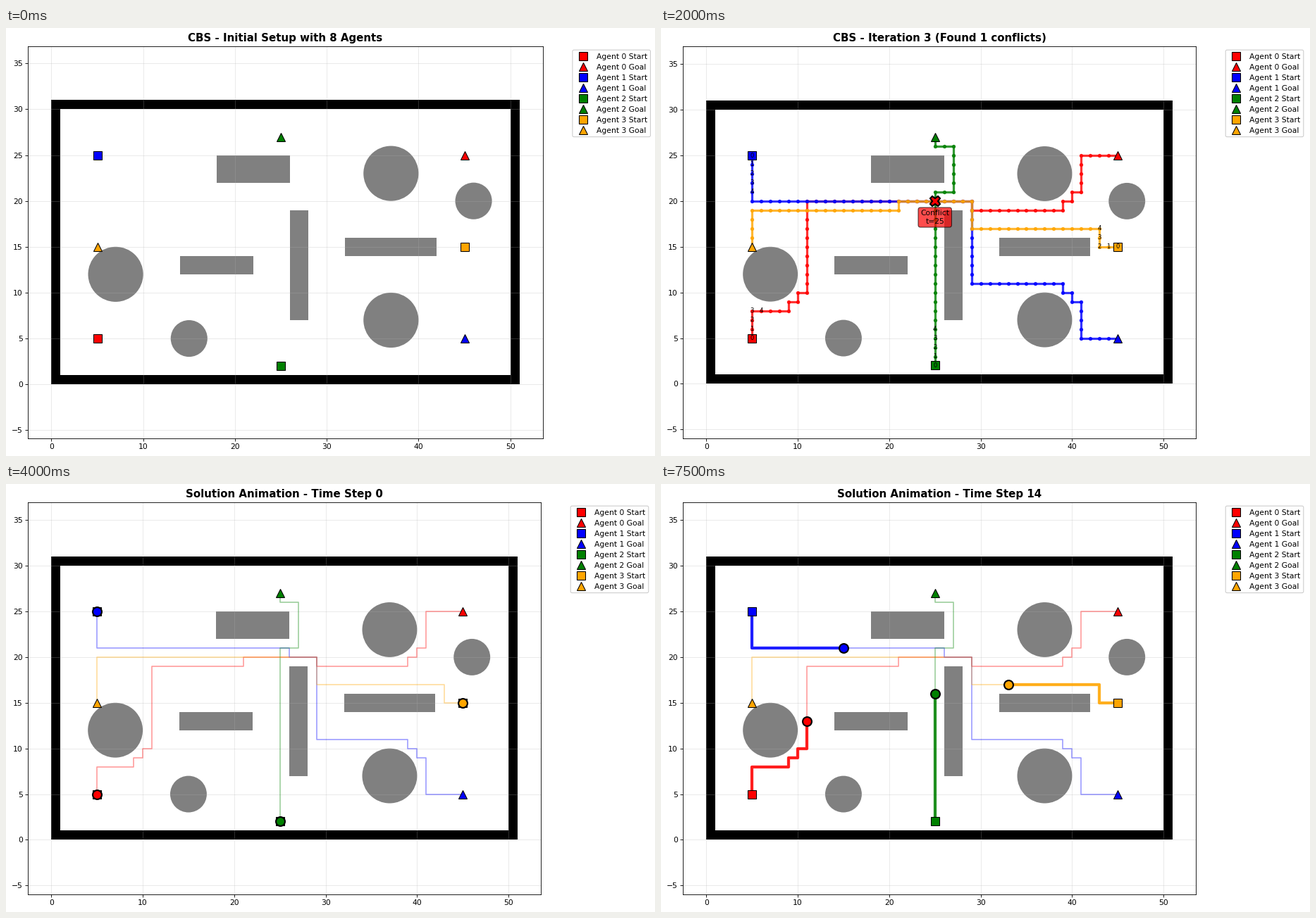
Recreate the animation shown at these times as a matplotlib script. Size 921 by 608 pixels, loop 8 s.

```python
from itertools import combinations

import matplotlib.pyplot as plt
from matplotlib.animation import FuncAnimation
from matplotlib.patches import Circle, FancyBboxPatch, Rectangle

W, H, DPI = 921, 608, 64
PT = 77 / DPI  # layout is measured in points at 77 dpi
EM = 10 * PT
LEFT, TOP, BOTTOM = 31.2, 25.6, 583
SPAN = 51 * 1.1  # map width plus margins

COLORS = ["red", "blue", "green", "orange"]
BLOCKS = [(18, 22, 8, 3), (14, 12, 8, 2), (26, 7, 2, 12), (32, 14, 10, 2)]
DISCS = [(7, 12, 3), (15, 5, 2), (37, 23, 3), (37, 7, 3), (46, 20, 2)]


def free(x, y, gap=0.5):
    return (all((x - cx) ** 2 + (y - cy) ** 2 > (r + gap) ** 2 for cx, cy, r in DISCS)
            and not any(bx - gap < x < bx + w + gap and by - gap < y < by + h + gap
                        for bx, by, w, h in BLOCKS))


def toward(a, b):
    return a + (b > a) - (b < a)


def route(*stops):
    """Step vertically when possible, else sideways; a repeated stop is a wait."""
    path = [stops[0]]
    for stop, (gx, gy) in zip(stops, stops[1:]):
        if stop == (gx, gy):
            path.append(stop)
        while path[-1] != (gx, gy):
            x, y = path[-1]
            up = toward(y, gy)
            path.append((x, up) if up != y and free(x, up) else (toward(x, gx), y))
    return path


def plan(detours=""):
    """Routes of all agents; letters name who detours (r, b, o) or waits (w)."""
    red = [(11, 19), (21, 19), (21, 20)] if "r" in detours else [(11, 20)]
    blue = [(5, 21), (26, 21), (26, 20)] if "b" in detours else [(5, 20)]
    orange = [(21, 20), (21, 19), (5, 19)] if "o" in detours else [(5, 20)]
    pause = [(43, 15)] if "w" in detours else []
    gate = (29, 20)
    return [
        route((5, 5), (5, 8), (7, 8), *red, gate, (29, 19), (37, 19), (45, 25)),
        route((5, 25), *blue, gate, (29, 11), (37, 11), (45, 5)),
        route((25, 2), (25, 21), (27, 26), (25, 26), (25, 27)),
        route((45, 15), (43, 15), *pause, (43, 17), (29, 17), gate, *orange, (5, 15)),
    ]


def find_conflicts(paths):
    found = []
    for a, b in combinations(paths, 2):
        for t in range(min(len(a), len(b)) - 1):
            if a[t] == b[t] or (a[t], a[t + 1]) == (b[t + 1], b[t]):
                found.append((*a[t], t))
    return found


ITERATIONS = [plan(d) for d in ("", "r", "o", "r", "ow")]
FINAL = plan("rb")

fig = plt.figure(figsize=(W / DPI, H / DPI), dpi=DPI, facecolor="white")
ax = fig.add_axes([0, 0, 1, 1])
side = fig.add_axes([0, 0, 1, 1])


def mark(axes, x, y, shape, color, size=11.5, edge=1, z=5):
    axes.plot([x], [y], shape, color=color, ms=size * PT, mec="black",
              mew=edge * PT, zorder=z, clip_on=False)


def draw_legend(right):
    x = right + 42
    side.clear()
    side.set(xlim=(0, W), ylim=(H, 0))
    side.axis("off")
    side.add_patch(FancyBboxPatch(
        (x, 31.2), 110.6, 123.4, boxstyle="round,pad=0,rounding_size=2.1",
        fc="white", ec="#cccccc", lw=PT))
    for k in range(8):
        agent, goal = divmod(k, 2)
        y = 40 + 15 * k
        mark(side, x + 15.2, y, "^" if goal else "s", COLORS[agent])
        side.text(x + 34.2, y + 4, f"Agent {agent} {'Goal' if goal else 'Start'}",
                  fontsize=EM, va="baseline")


def draw_map(title, right):
    draw_legend(right)
    width, height = right - LEFT, BOTTOM - TOP
    half = height / 2 * SPAN / width
    ax.clear()
    ax.set_position([LEFT / W, 1 - BOTTOM / H, width / W, height / H])
    ax.set(xlim=(25.5 - SPAN / 2, 25.5 + SPAN / 2), ylim=(15.5 - half, 15.5 + half))
    ax.set_xticks(range(0, 51, 10))
    ax.set_yticks(range(-5, 36, 5))
    ax.tick_params(labelsize=EM, length=3.5 * PT, width=0.8 * PT, pad=3.5 * PT)
    for spine in ax.spines.values():
        spine.set_linewidth(0.8 * PT)
    ax.grid(True, color="#b0b0b0", alpha=0.3, lw=0.8 * PT)
    ax.set_title(title, fontsize=14 * PT, fontweight="bold", pad=6 * PT)
    ax.add_patch(Rectangle((0, 0), 51, 31, fc="black", lw=0))
    ax.add_patch(Rectangle((1, 1), 49, 29, fc="white", lw=0))
    for x, y, w, h in BLOCKS:
        ax.add_patch(Rectangle((x, y), w, h, fc="gray", lw=0))
    for x, y, r in DISCS:
        ax.add_patch(Circle((x, y), r, fc="gray", lw=0))
    for path, color in zip(FINAL, COLORS):
        mark(ax, *path[0], "s", color)
        mark(ax, *path[-1], "^", color)


def draw_plan(paths):
    for path, color in zip(paths, COLORS):
        ax.plot(*zip(*path), "o-", color=color, lw=3 * PT, ms=4 * PT,
                mew=PT, alpha=0.8, zorder=2)
        for t, (x, y) in enumerate(path[:5]):
            ax.text(x, y, str(t), fontsize=8 * PT, ha="center", va="center", zorder=6)


def draw_conflict(x, y, t):
    mark(ax, x, y, "X", "red", size=13.5, edge=2, z=10)
    ax.text(x, y - 1.78, f"Conflict\nt={t}", fontsize=EM, ha="center", va="center",
            zorder=9, bbox=dict(boxstyle="round,pad=0.3", fc="red", ec="black",
                                alpha=0.7, lw=PT))


def draw_step(t):
    for path, color in zip(FINAL, COLORS):
        ax.plot(*zip(*path), color=color, lw=1.5 * PT, alpha=0.4, zorder=2)
        ax.plot(*zip(*path[:t + 1]), color=color, lw=4 * PT, alpha=0.85, zorder=3)
        mark(ax, *path[t], "o", color, size=12, edge=2, z=10)


def draw(i):
    right = 759.2
    if i == 0:
        draw_map("CBS - Initial Setup with 8 Agents", 761.9)
    elif i == 1:
        draw_map("CBS - Initial Solution (No Constraints)", right)
        draw_plan(plan())
    elif i < 7:
        paths = ITERATIONS[i - 2]
        conflicts = find_conflicts(paths)
        draw_map(f"CBS - Iteration {i - 1} (Found {len(conflicts)} conflicts)", right)
        draw_plan(paths)
        for conflict in conflicts:
            draw_conflict(*conflict)
    elif i == 7:
        draw_map("CBS - Final Solution Found!", right)
        draw_plan(FINAL)
    else:
        step = 2 * (i - 8)
        draw_map(f"Solution Animation - Time Step {step}", right)
        draw_step(step)


anim = FuncAnimation(fig, draw, frames=16, init_func=lambda: draw(0),
                     interval=500, repeat=True, repeat_delay=0, blit=False)
plt.show()
```
